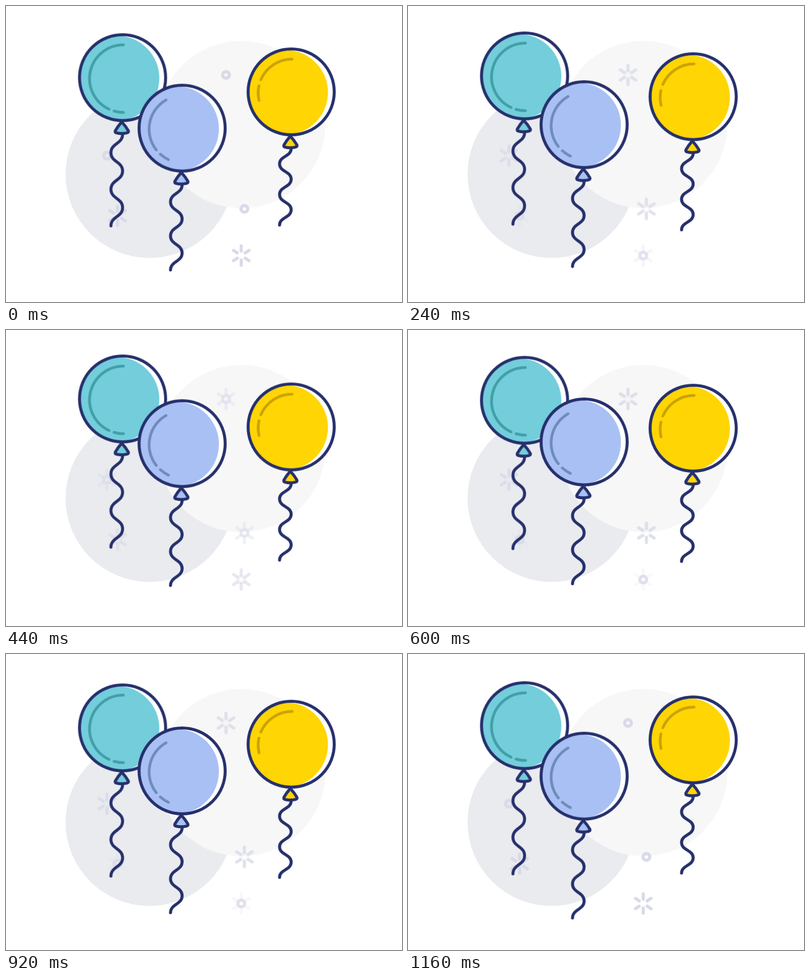
These frames come from a looping animation (800x600 px, 1.2 s). An HTML page:

```html
<!DOCTYPE html>
<html lang="en">
<head>
<meta charset="utf-8">
<title>Balloons</title>
<style>
  html, body { margin: 0; width: 100%; height: 100%; overflow: hidden; background: #fff; }
  svg { display: block; width: 800px; height: 600px; }
  .line { fill: none; stroke-linecap: round; stroke-linejoin: round; }
  .ink { stroke: #26306c; stroke-width: 6; }
  .shine { stroke-width: 5.5; }
  .deco { stroke: #d8dae8; stroke-width: 6.4; }
</style>
</head>
<body>
<svg viewBox="0 0 800 600">
  <defs><clipPath id="disc"><circle r="87"/></clipPath></defs>
  <circle cx="290" cy="341" r="169.7" fill="#e9ebef"/>
  <circle cx="475.5" cy="240.3" r="169.5" fill="#f7f7f7"/>
  <g id="decor"></g>
  <g id="balloons"></g>
</svg>
<script>
const LOOP = 1200;
const EASE = 'cubic-bezier(.37,0,.63,1)';
const NS = 'http://www.w3.org/2000/svg';

function add(parent, tag, attrs) {
  const el = document.createElementNS(NS, tag);
  for (const key in attrs) el.setAttribute(key, attrs[key]);
  return parent.appendChild(el);
}

// steps: [time in ms, value] pairs
function play(el, steps, toStyle, easing) {
  const frames = steps.map(([ms, v]) => ({ offset: ms / LOOP, easing, ...toStyle(v) }));
  el.animate(frames, { duration: LOOP, iterations: Infinity });
}

// Arc inside the balloon, running counter-clockwise between two angles
function shineArc(from, to) {
  const point = deg => {
    const a = deg * Math.PI / 180;
    return (1.7 + 68.4 * Math.cos(a)).toFixed(2) + ' ' + (2 + 68.4 * Math.sin(a)).toFixed(2);
  };
  return `M${point(from)}A68.4 68.4 0 0 0 ${point(to)}`;
}

function stringPath(step) {
  let d = 'M0 115', x = 0, y = 115;
  for (let i = 0; i < 5; i++) {
    const next = x ? 0 : -23.5;
    d += `C${x} ${y + step * .52} ${next} ${y + step * .48} ${next} ${y + step}`;
    x = next;
    y += step;
  }
  return d;
}

const KNOT = 'M-3.6 92Q-9 98 -14.6 107.5Q-16 111 -12.5 111.8Q-2 114.6 9 111.8Q13 111 11.5 107.5' +
  'Q6 98 .2 92Q-1.7 90 -3.6 92Z';

const balloons = [
  { x: 235.5, y: 145.2, fill: '#73cddb', shade: '#40a0a6', step: 37.1,
    arcs: [[270, 115], [106, 90]],
    bob: [[0, 0], [410, -5.5], [475, -5.5], [840, 5.3], [1160, 0], [1200, 0]] },
  { x: 355.8, y: 247.6, fill: '#a8c0f4', shade: '#6f8bba', step: 34.5,
    arcs: [[240, 142], [132, 115.5]],
    bob: [[0, 0], [604, -20.7], [690, -20.7], [1160, 0], [1200, 0]] },
  { x: 576.1, y: 174.1, fill: '#ffd504', shade: '#cba205', step: 31,
    arcs: [[270, 203], [192, 167]],
    bob: [[0, 0], [565, 25.2], [1160, 0], [1200, 0]] }
];

const sky = document.getElementById('balloons');
for (const b of balloons) {
  const spot = add(sky, 'g', { transform: `translate(${b.x} ${b.y})` });
  const g = add(spot, 'g', {});
  add(g, 'path', { class: 'line ink', d: stringPath(b.step) });
  add(g, 'path', { class: 'line ink', d: KNOT, style: `fill:${b.fill}` });
  add(g, 'circle', { r: 87, fill: '#fff' });
  const inner = add(g, 'g', { 'clip-path': 'url(#disc)' });
  add(inner, 'circle', { cx: -11.7, cy: 1, r: 86, fill: b.fill });
  for (const [from, to] of b.arcs)
    add(g, 'path', { class: 'line shine', stroke: b.shade, d: shineArc(from, to) });
  add(g, 'circle', { class: 'line ink', r: 87 });
  play(g, b.bob, y => ({ transform: `translate(0px, ${y}px)` }), EASE);
}

// Each ornament cross-fades between a ring and a star; the last flag swaps their roles
const ornaments = [
  [444.5, 139.7, false], [204, 303.4, false], [481.6, 411.2, false],
  [225.4, 425, true], [475.2, 505.8, true]
];
const STAR = 'M0-9.3V-19.6M0 9.3V19.6M8-5.4L15.6-10.4M-8-5.4L-15.6-10.4M8 5.4L15.6 10.4M-8 5.4L-15.6 10.4';
const blink = [[0, 0], [200, 1], [360, 0], [570, 1], [750, 0], [965, 1], [1160, 0], [1200, 0]];

const decor = document.getElementById('decor');
for (const [x, y, swap] of ornaments) {
  const g = add(decor, 'g', { transform: `translate(${x} ${y})` });
  const star = add(g, 'path', { class: 'line deco', d: STAR });
  const ring = add(g, 'circle', { class: 'line deco', r: 6.8 });
  const [first, second] = swap ? [star, ring] : [ring, star];
  play(first, blink, v => ({ opacity: 1 - v }), 'linear');
  play(second, blink, v => ({ opacity: v }), 'linear');
}
</script>
</body>
</html>
```
